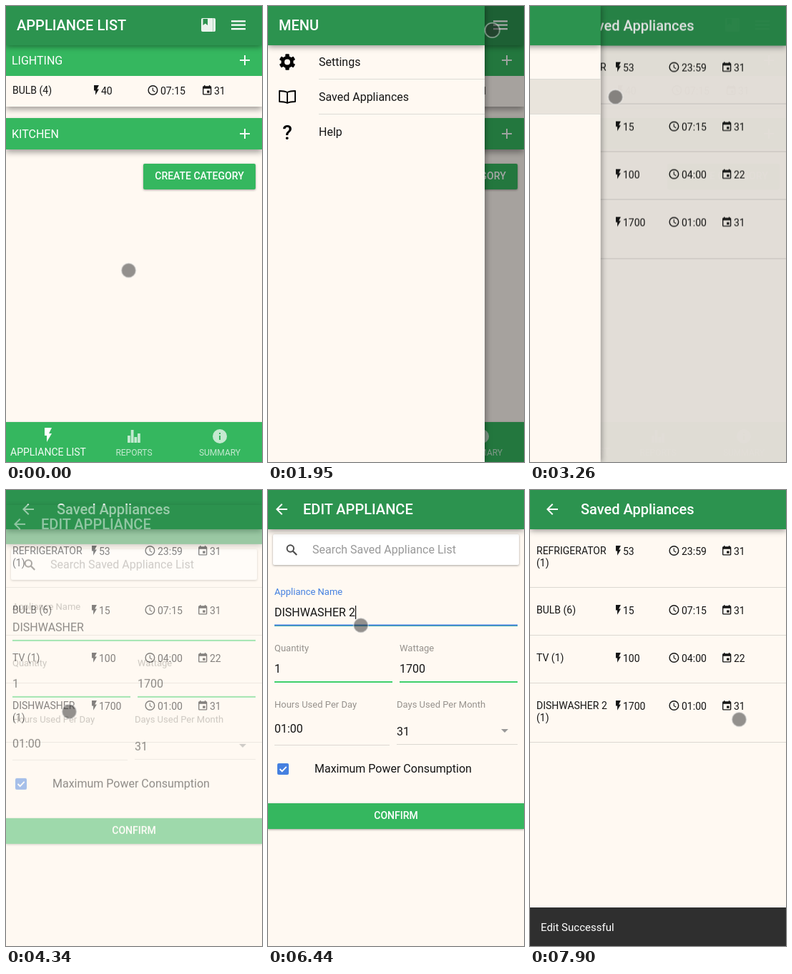
Write an HTML page that moves like this. It is 358 px wide and 639 px high and loops after 8000 ms.

```html
<!DOCTYPE html>
<html lang="en">
<head>
<meta charset="utf-8">
<title>Appliance list</title>
<style>
html, body { margin: 0; width: 100%; height: 100%; overflow: hidden; background: #fff9f2; }
svg { display: block; width: 358px; height: 639px; font-family: Roboto, sans-serif; }
.head { filter: drop-shadow(0 2px 4px rgba(0,0,0,.42)); }
.card { filter: drop-shadow(0 4px 4px rgba(0,0,0,.36)); }
.btn { filter: drop-shadow(0 1px 1.5px rgba(0,0,0,.35)); }
.side { filter: drop-shadow(1px 0 4px rgba(0,0,0,.4)); }
</style>
</head>
<body>
<svg id="stage" viewBox="0 0 358 639"></svg>
<script>
const CREAM = '#fff9f2', DARK = '#2c934f', GREEN = '#35b75f', BLUE = '#4580e0', INK = '#151515', GREY = '#96928d';
const LOOP = 8000;

const text = (x, y, s, size = 14, fill = INK, weight = 400, anchor = 'start', extra = '') =>
  `<text x="${x}" y="${y}" font-size="${size}" fill="${fill}" font-weight="${weight}" text-anchor="${anchor}" ${extra}>${s}</text>`;
const rect = (x, y, w, h, fill, extra = '') =>
  `<rect x="${x}" y="${y}" width="${w}" height="${h}" fill="${fill}" ${extra}/>`;
const at = (x, y, body, scale = 1) => `<g transform="translate(${x} ${y}) scale(${scale})">${body}</g>`;
const group = (id, body, extra = '') => `<g id="${id}" ${extra}>${body}</g>`;
const line = (d, stroke, width, extra = '') => `<path d="${d}" fill="none" stroke="${stroke}" stroke-width="${width}" ${extra}/>`;

const bolt = fill => `<path fill="${fill}" d="M7 2v11h3v9l7-12h-4l4-8z"/>`;
const clock = `<circle cx="12" cy="12" r="9" fill="none" stroke="${INK}" stroke-width="2"/>` +
  line('M11.8 7v5.6l4.4 2.6', INK, 1.6);
const calendar = `<path fill="${INK}" d="M17 12h-5v5h5zM16 1v2H8V1H6v2H5q-2 0-2 2v14q0 2 2 2h14q2 0 2-2V5q0-2-2-2h-1V1zM19 19H5V8h14z"/>`;
const arrow = '<path fill="#fff" d="M20 11H7.8l5.6-5.6L12 4l-8 8 8 8 1.4-1.4L7.8 13H20z"/>';

const header = (x, title, icons = '') =>
  rect(0, 0, 358, 55, DARK, 'class="head"') + text(x, 34, title, 20, '#fff', 500) + icons;
const page = (id, body) => group(id, rect(0, 0, 358, 639, CREAM) + body);

// Power, hours and days; x positions are those of the three values
const stats = (xs, y, values) => {
  const [a, b, c] = xs;
  return at(a - 14.8, y - 14.4, bolt(INK), .69) + at(b - 19, y - 14.4, clock, .7) +
    at(c - 18, y - 13.7, calendar, .68) + values.map((v, i) => text(xs[i], y, v)).join('');
};

const section = (y, name) => rect(0, y, 358, 44, GREEN) + text(8, y + 28, name, 16, '#fff') +
  line(`M327 ${y + 22}h14m-7 -7v14`, '#f1faf4', 2);

const listPage = () => {
  const icons = rect(273, 17, 20, 19, '#e9f3ec', 'rx="2"') +
    `<path fill="${DARK}" d="M275.500 18h6.500v9l-3.250-2.500-3.250 2.500z"/>` +
    line('M289.500 17v19', '#a9cfb6', 1) + line('M315 21.300h20M315 26.700h20M315 32.100h20', '#fff', 2.2);
  const soft = '#c4e9d0';
  const bars = [[170, 602], [174.700, 594], [179.400, 604], [184, 599]]
    .map(([x, y]) => rect(x, y, 3.800, 612 - y, soft)).join('');
  const info = `<circle cx="299" cy="603" r="10" fill="${soft}"/>` +
    rect(298, 598, 2, 2, GREEN) + rect(298, 602, 2, 6, GREEN);
  return page('list',
    `<g class="card">${rect(0, 55, 358, 86, CREAM)}${section(54, 'LIGHTING')}</g>` +
    text(9, 123, 'BULB (4)') + stats([133, 216, 291], 124, [40, '07:15', 31]) +
    `<g class="card">${section(157, 'KITCHEN')}</g>` +
    rect(192, 221, 157, 36, GREEN, 'rx="2" class="btn"') +
    text(270.500, 243, 'CREATE CATEGORY', 14, '#fff', 500, 'middle') +
    rect(0, 583, 358, 56, GREEN, 'class="btn"') +
    at(47, 589, bolt('#fff')) + bars + info +
    text(59, 630, 'APPLIANCE LIST', 14, '#f4fbf6', 400, 'middle') +
    text(179, 630, 'REPORTS', 12, soft, 400, 'middle') +
    text(299, 630, 'SUMMARY', 12, soft, 400, 'middle') +
    header(15, 'APPLIANCE LIST', icons));
};

const savedPage = () => {
  const rows = [
    [90, 'REFRIGERATOR', [53, '23:59', 31], 136],
    [173, 'BULB (6)', [15, '07:15', 31], 203],
    [240, 'TV (1)', [100, '04:00', 22], 270],
    [307, '', [1700, '01:00', 31], 353]
  ];
  return page('saved',
    rows.map(([y, name, values, end]) => text(9, y, name) + stats([130, 212, 285], y + 1, values) +
      rect(0, end, 358, 1, '#dcd8d2')).join('') +
    text(9, 107, '(1)') + text(9, 324, '(1)') +
    text(9, 307, 'DISHWASHER', 14, INK, 400, 'start', 'id="rowOld"') +
    text(9, 307, 'DISHWASHER 2', 14, INK, 400, 'start', 'id="rowNew"') +
    header(71, 'Saved Appliances', at(19, 15, arrow)));
};

const editPage = () => {
  const label = (x, y, s) => text(x, y, s, 13, GREY);
  const value = (x, y, s, extra) => text(x, y, s, 16, INK, 400, 'start', extra);
  return page('edit',
    rect(7, 62, 344, 43, '#fff', 'rx="2" class="btn"') +
    `<circle cx="31.300" cy="82" r="4.700" fill="none" stroke="#4d4d4d" stroke-width="2"/>` +
    line('M34.700 85.500l5.500 5.500', '#4d4d4d', 2.2) +
    text(62, 89, 'Search Saved Appliance List', 16, '#999') +
    label(9, 147, 'Appliance Name') + rect(9, 189, 340, 2, '#3fd06c') +
    group('focus', rect(9, 134, 100, 18, CREAM) + text(9, 147, 'Appliance Name', 13, BLUE) + rect(9, 188.500, 340, 2, BLUE)) +
    value(9, 177, 'DISHWASHER', 'id="nameOld"') + value(9, 177, 'DISHWASHER 2', 'id="nameNew"') +
    group('caret', rect(0, 162, 1.200, 19, INK)) +
    label(9, 226, 'Quantity') + value(9, 256, 1) + rect(9, 268, 165, 2, '#3fd06c') +
    label(184, 226, 'Wattage') + value(184, 256, 1700) + rect(184, 268, 165, 2, '#3fd06c') +
    label(9, 305, 'Hours Used Per Day') + value(9, 340, '01:00') + rect(9, 357, 161, 1, '#dcd8d2') +
    label(180, 305, 'Days Used Per Month') + value(180, 344, 31) + rect(180, 356, 169, 1, '#dcd8d2') +
    `<path fill="#999" d="M326 335h10l-5 5z"/>` +
    rect(13, 383, 16, 16, BLUE, 'rx="2"') + line('M16.500 391l3.200 3.200 6-6.400', '#fff', 1.8) +
    value(65, 396, 'Maximum Power Consumption') +
    rect(0, 439, 358, 36, GREEN, 'class="btn"') + text(179, 461, 'CONFIRM', 14, '#fff', 500, 'middle') +
    header(49, 'EDIT APPLIANCE', at(7, 15, arrow)));
};

const drawer = () => {
  const teeth = [0, 60, 120, 180, 240, 300]
    .map(a => rect(-2.700, -11.300, 5.400, 5, '#000', `rx="1" transform="rotate(${a})"`)).join('');
  const gear = teeth + '<circle r="6.300" fill="none" stroke="#000" stroke-width="4.600"/>';
  const book = line('M27 121q-4-2-11-2v15q7 0 11 2q4-2 11-2v-15q-7 0-11 2zv15', '#000', 1.9, 'stroke-linejoin="round"');
  const items = ['Settings', 'Saved Appliances', 'Help']
    .map((s, i) => text(71, 84 + 49 * i, s, 16)).join('');
  return group('drawer',
    `<g class="side">${rect(0, 0, 303, 639, CREAM)}</g>` +
    group('press', rect(0, 103, 303, 48, '#e9e4dc')) +
    rect(71, 102, 232, 1, '#dcdcd6') + rect(71, 151, 232, 1, '#dcdcd6') +
    at(27, 78.500, gear) + book + text(27, 187, '?', 28, '#000', 500, 'middle') + items +
    `<svg width="303" height="70">${rect(0, 0, 303, 55, DARK, 'class="head"')}</svg>` +
    text(15, 34, 'MENU', 20, '#fff', 500));
};

document.getElementById('stage').innerHTML = listPage() + savedPage() + editPage() +
  group('toast', rect(0, 585, 358, 54, '#2f2f2f') + text(15, 618, 'Edit Successful', 15, '#fff')) +
  group('dim', rect(0, 0, 358, 639, '#000')) + drawer() +
  group('cursor', '<circle r="10.300" fill="rgba(40,40,40,.5)" stroke="rgba(255,255,255,.5)" stroke-width="1.500"/>');

// Each step: [ms, properties, easing towards the next step]
const start = document.timeline.currentTime;
const play = (id, steps) => {
  const all = [[0, steps[0][1], 'steps(1)'], ...steps, [LOOP, steps[steps.length - 1][1]]];
  const frames = all.map(([ms, props, easing = 'linear']) => ({ ...props, offset: ms / LOOP, easing }));
  document.getElementById(id).animate(frames, { duration: LOOP, iterations: Infinity }).startTime = start;
};
const move = (x, y) => ({ transform: `translate(${x}px, ${y}px)` });
const show = opacity => ({ opacity });
const sheet = (y, opacity) => ({ ...move(0, y), opacity });
const switches = (id, first, ...times) =>
  play(id, [[0, show(first), 'steps(1)'], ...times.map((ms, i) => [ms, show(i % 2 ? first : 1 - first), 'steps(1)'])]);

const ENTER = 'cubic-bezier(.36,.66,.04,1)', LEAVE = 'cubic-bezier(.47,0,.745,.715)';
const OPEN = 'cubic-bezier(0,0,.2,1)', CLOSE = 'cubic-bezier(.4,0,.6,1)', GLIDE = 'cubic-bezier(.37,0,.63,1)';

play('drawer', [[1396, move(-320, 0), 'steps(1)'], [1396, move(-303, 0), OPEN], [1676, move(0, 0)],
  [3091, move(0, 0), CLOSE], [3371, move(-303, 0), 'steps(1)'], [3372, move(-320, 0)]]);
play('dim', [[1396, show(0), OPEN], [1676, show(.35)], [3091, show(.35), CLOSE], [3371, show(0)]]);
switches('press', 0, 3080, 3400);

play('saved', [[3060, sheet(40, 0), ENTER], [3340, sheet(0, 1)]]);
play('edit', [[4289, sheet(40, 0), ENTER], [4569, sheet(0, 1)], [7240, sheet(0, 1), LEAVE], [7440, sheet(40, 0)]]);
play('toast', [[7300, move(0, 56), ENTER], [7700, move(0, 0)]]);

switches('focus', 0, 5430);
switches('nameOld', 1, 6120);
switches('nameNew', 0, 6120);
switches('rowOld', 1, 5430);
switches('rowNew', 0, 5430);
switches('caret', 0, 5430, 6620, 7050, 7240);
play('caret', [[5430, move(110.500, 0), 'steps(1)'], [5660, move(113, 0), 'steps(1)'], [6120, move(122, 0)]]);

play('cursor', [
  [130, move(171.500, 370.500), GLIDE], [1060, move(320.500, 30.500)],
  [1868, move(320.500, 30.500), GLIDE], [2560, move(119.500, 127.500)],
  [3340, move(119.500, 127.500), GLIDE], [4010, move(88.500, 309)], [4110, move(88.500, 310.500)],
  [4690, move(88.500, 310.500), GLIDE], [5200, move(129.500, 173)],
  [6340, move(129.500, 173), GLIDE], [6980, move(134.500, 453)], [7130, move(134.500, 455)],
  [7340, move(134.500, 455), GLIDE], [7900, move(292.500, 321.500)]
]);
</script>
</body>
</html>
```
